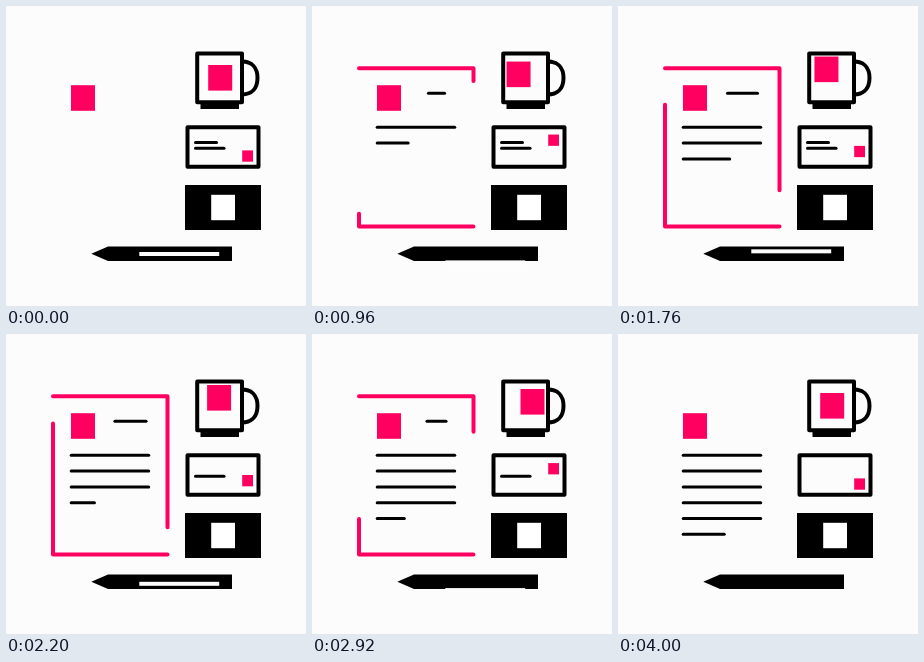
An HTML page that plays this animation: 300x300 px, repeating every 4.04 s.

```html
<!DOCTYPE html>
<html lang="en">
<head>
<meta charset="utf-8">
<title>Stationery</title>
<style>
  html, body { margin: 0; width: 100%; height: 100%; overflow: hidden; background: #fcfcfc; }
  svg { display: block; width: 100vw; height: 100vh; }
  .line { fill: none; stroke: #000; stroke-linecap: round; stroke-linejoin: round; }
  .pink { fill: #ff0060; }
  .frame { stroke: #ff0060; stroke-width: 4; }
</style>
</head>
<body>
<svg viewBox="0 0 300 300">
  <!-- letter -->
  <path class="line frame" d="M47 62.3H161.5V220.5"/>
  <path class="line frame" d="M161.5 220.5H47V62.3"/>
  <rect class="pink" x="65" y="79.2" width="24" height="25.6"/>
  <path id="date" class="line" stroke-width="3"/>
  <g id="rows"></g>

  <!-- mug -->
  <path class="line" stroke-width="4" d="M236 55.6C246 55.6 251.5 62 251.5 72S246 88.5 236 88.5"/>
  <rect class="line" stroke-width="4" x="191.2" y="47.4" width="44.8" height="48.8"/>
  <rect x="194.5" y="96" width="38.5" height="7"/>
  <rect id="mugSquare" class="pink" width="24" height="25.6"/>

  <!-- business card -->
  <rect class="line" stroke-width="4" x="181.5" y="121.3" width="71" height="39.5"/>
  <path id="cardLine1" class="line" stroke-width="3" d="M189.5 136.6H210.5"/>
  <path id="cardLine2" class="line" stroke-width="3" d="M189.5 142.3H218"/>
  <rect id="cardSquare" class="pink" x="236.2" width="10.8" height="11.3"/>

  <!-- dark card -->
  <rect x="179" y="179" width="76" height="45"/>
  <rect x="205.2" y="188.8" width="23.8" height="25.4" fill="#fff"/>

  <!-- pen -->
  <path d="M85.3 247.8L102 240.5H226V255H102Z"/>
  <rect id="bar" x="133.3" width="79.9" height="4" fill="#fcfcfc"/>
</svg>
<script>
const LOOP = 4040, STEP = 40, ROWS = 6, ROW_WIDTH = 77.5, LAST_WIDTH = 41;
const FRAME_LENGTH = 272.7;
const $ = id => document.getElementById(id);
const frames = document.querySelectorAll('.frame');

const rows = Array.from({ length: ROWS }, () => {
  const row = document.createElementNS('http://www.w3.org/2000/svg', 'path');
  row.setAttribute('class', 'line');
  row.setAttribute('stroke-width', 3);
  return $('rows').appendChild(row);
});

// time in seconds, x, y
const mugPath = [
  [0, 202.2, 59], [0.6, 196.6, 57.4], [1.3, 193.5, 53.2], [1.75, 196.6, 50.5],
  [2.2, 201.1, 51], [2.9, 208.5, 55], [3.433, 206.5, 58], [4, 202.2, 59]
];

const show = (el, on) => el.setAttribute('visibility', on ? 'visible' : 'hidden');
const triangle = (t, period) => 1 - Math.abs(1 - (t % period) * 2 / period);

// Smooth closed curve through timed points
function along(points, t) {
  const n = points.length - 1, period = points[n][0];
  const at = i => {
    const turn = Math.floor(i / n), [s, x, y] = points[i - turn * n];
    return [s + turn * period, x, y];
  };
  let i = 0;
  while (i < n - 1 && t >= at(i + 1)[0]) i++;
  const [a, b, c, d] = [i - 1, i, i + 1, i + 2].map(at);
  const span = c[0] - b[0], u = Math.min(1, (t - b[0]) / span);
  return [1, 2].map(k => {
    const m0 = (c[k] - a[k]) / (c[0] - a[0]) * span;
    const m1 = (d[k] - b[k]) / (d[0] - b[0]) * span;
    const e = c[k] - b[k];
    return b[k] + u * (m0 + u * (3 * e - 2 * m0 - m1 + u * (m0 + m1 - 2 * e)));
  });
}

function draw(t) {
  const grow = triangle(t, 4);
  for (const path of frames) {
    show(path, grow > 0.001);
    path.setAttribute('stroke-dasharray', `${grow * FRAME_LENGTH} 999`);
  }

  const half = 17.3 * grow;
  show($('date'), grow > 0.001);
  $('date').setAttribute('d', `M${124.5 - half} 87.2H${124.5 + half}`);

  rows.forEach((row, i) => {
    const limit = i === ROWS - 1 ? LAST_WIDTH : ROW_WIDTH;
    const width = Math.min(limit, (t * ROWS / 4 - i) * ROW_WIDTH);
    show(row, width > 0.001);
    row.setAttribute('d', `M65.2 ${121.3 + i * 15.8}h${Math.max(0, width)}`);
  });

  const [x, y] = along(mugPath, t);
  $('mugSquare').setAttribute('x', x);
  $('mugSquare').setAttribute('y', y);

  $('cardSquare').setAttribute('y', 144.4 - 17 * triangle(t, 2));
  show($('cardLine1'), t < 2);
  show($('cardLine2'), t < 3);

  // The bar leaves below the pen and comes back in from above
  const phase = t % 2;
  $('bar').setAttribute('y', phase < 1 ? 246 + 9 * phase : 236 + 10 * (phase - 1));
  show($('bar'), t < 4);
}

function tick() {
  const step = Math.floor(performance.now() % LOOP / STEP);
  draw(Math.floor(step * 1.2 + 1e-6) / 30);
  requestAnimationFrame(tick);
}
tick();
</script>
</body>
</html>
```
